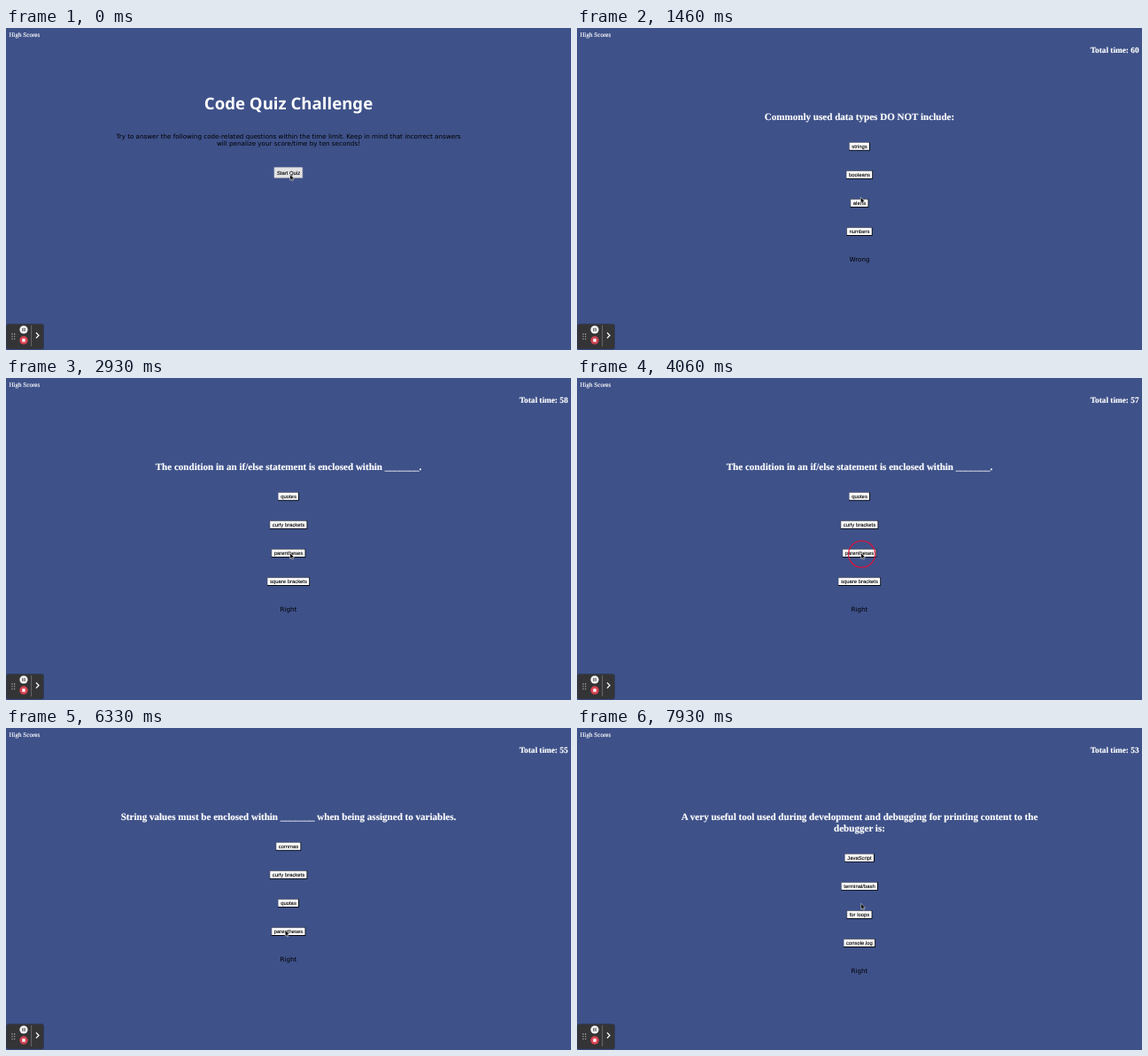
An HTML page that plays this animation: 638x364 px, repeating every 8 s.

```html
<!DOCTYPE html>
<html lang="en">
<head>
<meta charset="utf-8">
<title>Code Quiz Challenge</title>
<style>
  html, body { margin: 0; width: 100%; height: 100%; overflow: hidden; background: #3e5189; }
  svg { display: block; width: 638px; height: 364px; }
  text { white-space: pre; text-rendering: geometricPrecision; }
  .serif { font-family: "Liberation Serif", serif; fill: #fff; stroke: #fff; stroke-width: .15; }
  .bold { font-weight: 700; }
  .title { font: 700 18.62px "Noto Sans", sans-serif; fill: #fff; }
  .body { font: 7.17px "DejaVu Sans", sans-serif; fill: #000; }
  .label { font: 5.9px "Liberation Sans", sans-serif; fill: #000; stroke: #000; stroke-width: .1; }
  .mid { text-anchor: middle; }
</style>
</head>
<body>
<svg id="stage" viewBox="0 0 638 364">
  <rect width="638" height="364" fill="#3e5189"/>
  <text class="serif" x="3.4" y="10.2" font-size="7.09">High Scores</text>
  <text id="timer" class="serif bold" x="634.6" y="28" font-size="9.3" text-anchor="end"></text>
  <g id="pages"></g>
  <g id="toolbar">
    <rect x="0" y="334.2" width="43" height="29.4" rx="3" fill="#000" opacity=".25"/>
    <rect x="0.5" y="334.8" width="41.8" height="28" rx="2.5" fill="#343436"/>
    <path d="M28.6 336V360" stroke="#77777a" stroke-width=".8"/>
    <path d="M7 346h0M9.7 346h0M7 348.8h0M9.7 348.8h0M7 351.6h0M9.7 351.6h0"
          stroke="#d0d0d0" stroke-width="1.3" stroke-linecap="round"/>
    <circle cx="20" cy="341" r="4.6" fill="#f3f3f3"/>
    <path d="M18.9 339.1v3.8M21.1 339.1v3.8" stroke="#343436" stroke-width="1"/>
    <circle id="record" cx="20" cy="353" r="4.7" fill="#da4453"/>
    <rect x="18.3" y="351.3" width="3.4" height="3.4" rx=".5" fill="#fff"/>
    <path d="M34 344.4l3 3.1-3 3.1" fill="none" stroke="#fff" stroke-width="1.3"/>
  </g>
  <circle id="ring" r="15" fill="none" stroke="#d8123c" stroke-width="1.2"/>
  <path id="cursor" d="M0 0V6.6L1.5 5.3 2.5 7.6 3.7 7.1 2.7 4.8H4.8Z"
        fill="#000" stroke="#fff" stroke-width=".5" stroke-linejoin="round"/>
</svg>
<script>
const LOOP = 8000, CENTER = 319;
const CLICKS = [790, 2300, 4200, 5850, 7200];
const FIRST_TICK = 1790;

// [time, x, y] of the pointer tip
const POINTER = [
  [0, 320.7, 165.4], [950, 320.7, 165.4], [1460, 320.3, 191.3], [1700, 320.7, 197.8],
  [4300, 320.7, 197.8], [4700, 320.7, 196], [5300, 320.7, 196], [5650, 315.2, 228.5],
  [6400, 315.2, 228.5], [6850, 320.7, 197], [7400, 320.7, 197], [7700, 320.7, 188],
  [7850, 320.7, 188], [7925, 320.7, 198.3], [8000, 320.7, 198.3]
];

const QUESTIONS = [
  { lines: ["Commonly used data types DO NOT include:"],
    answers: ["strings", "booleans", "alerts", "numbers"], result: "Wrong" },
  { lines: ["The condition in an if/else statement is enclosed within _______."],
    answers: ["quotes", "curly brackets", "parentheses", "square brackets"], result: "Right" },
  { lines: ["Arrays in JavaScript can be used to store ______."],
    answers: ["numbers and strings", "other arrays", "booleans", "all of the above"], result: "Right" },
  { lines: ["String values must be enclosed within _______ when being assigned to variables."],
    answers: ["commas", "curly brackets", "quotas", "parentheses"], result: "Right" },
  { lines: ["A very useful tool used during development and debugging for printing content to the", "debugger is:"],
    answers: ["JavaScript", "terminal/bash", "for loops", "console.log"], result: "Right" }
];

const $ = id => document.getElementById(id);

function add(parent, tag, attrs, content = "") {
  const node = document.createElementNS("http://www.w3.org/2000/svg", tag);
  for (const key in attrs) node.setAttribute(key, attrs[key]);
  node.textContent = content;
  return parent.appendChild(node);
}

const centered = (parent, cls, y, content, size) =>
  add(parent, "text", { class: cls + " mid", x: CENTER, y, ...(size && { "font-size": size }) }, content);

function button(parent, y, content, height, fill, light, dark) {
  const label = centered(parent, "label", y + 2.1, content);
  const w = label.getComputedTextLength() + 6.2, x = CENTER - w / 2, top = y - height / 2;
  const box = (dx, dy, bw, bh, color) =>
    parent.insertBefore(add(parent, "rect", { x: x + dx, y: top + dy, width: bw, height: bh, fill: color }), label);
  box(0, 0, w, height, dark);
  box(0, 0, w - 0.9, height - 0.9, light);
  box(0.7, 0.7, w - 1.6, height - 1.6, fill);
}

function startPage(page) {
  centered(page, "title", 92.2, "Code Quiz Challenge");
  centered(page, "body", 124.8, "Try to answer the following code-related questions within the time limit. Keep in mind that incorrect answers");
  centered(page, "body", 133.4, "will penalize your score/time by ten seconds!");
  button(page, 163.7, "Start Quiz", 12.4, "#e3e3e6", "#d0d0d6", "#a0a0aa");
}

function questionPage(page, { lines, answers, result }) {
  const shift = (lines.length - 1) * 13;
  lines.forEach((line, i) => centered(page, "serif bold", 103.8 + i * 13, line, 11.07));
  answers.forEach((answer, i) =>
    button(page, 133.9 + shift + i * 32.1, answer, 9.4, "#fff", "#8f93a4", "#000"));
  centered(page, "body", 264 + shift, result);
}

const pages = [null, ...QUESTIONS].map(question => {
  const page = add($("pages"), "g", {});
  question ? questionPage(page, question) : startPage(page);
  return page;
});

function pointerAt(t) {
  const i = POINTER.findIndex(([time]) => time > t);
  const [t0, x0, y0] = POINTER[i - 1], [t1, x1, y1] = POINTER[i];
  const p = (t - t0) / (t1 - t0), e = p * p * (3 - 2 * p);
  return [x0 + (x1 - x0) * e, y0 + (y1 - y0) * e];
}

function draw(t) {
  const current = CLICKS.filter(click => t >= click).length;
  pages.forEach((page, i) => page.style.display = i === current ? "" : "none");

  const ticks = Math.max(0, Math.floor((t - FIRST_TICK) / 1000) + 1);
  $("timer").textContent = current ? `Total time: ${60 - ticks}` : "";

  const [x, y] = pointerAt(t);
  $("cursor").setAttribute("transform", `translate(${x} ${y})`);

  // The ring shows on press, just before the page changes on release.
  const press = CLICKS.map(click => t - click + 200).find(age => age >= 0 && age < 320);
  $("ring").setAttribute("cx", x + 0.9);
  $("ring").setAttribute("cy", y + 1.3);
  $("ring").style.opacity = press === undefined ? 0 : Math.min(1, (320 - press) / 120);

  $("record").style.opacity = 0.95 + 0.05 * Math.cos(t / 1000 * 2 * Math.PI);
}

const began = performance.now();
function frame() {
  draw((performance.now() - began) % LOOP);
  requestAnimationFrame(frame);
}
frame();
</script>
</body>
</html>
```
